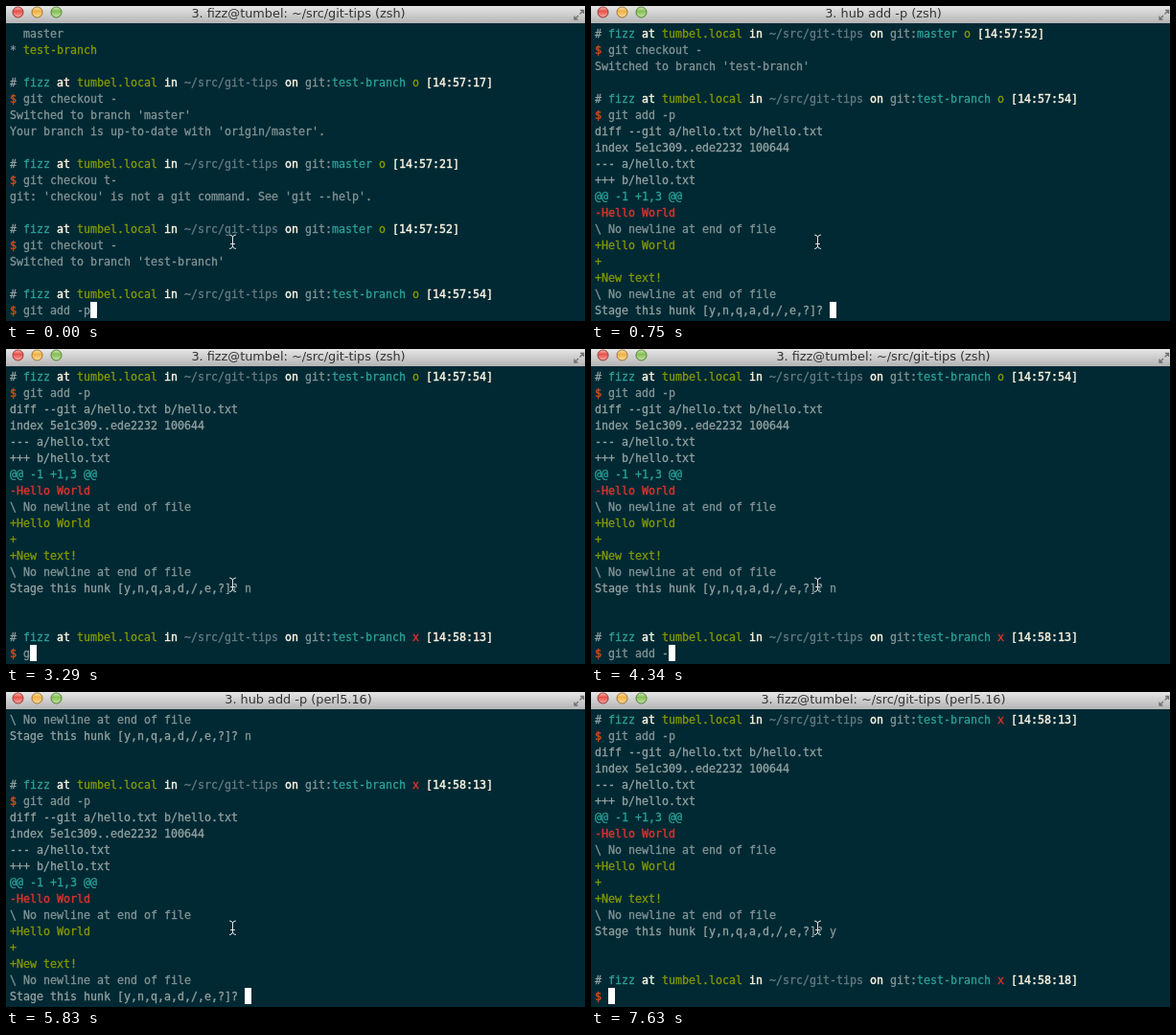
Write an HTML page that moves like this. It is 604 px wide and 329 px high and loops after 8 s.

```html
<!DOCTYPE html>
<html lang="en">
<head>
<meta charset="utf-8">
<title>git add -p</title>
<style>
  html, body { margin: 0; width: 100%; height: 100%; overflow: hidden; background: #002933; }
  #stage { position: relative; width: 604px; height: 329px; overflow: hidden; }

  #bar {
    position: absolute; left: 0; top: 0; width: 604px; height: 18px;
    background: linear-gradient(#e6e6e6, #b4b4b4);
  }
  #titles { position: absolute; left: 3px; top: -1px; width: 604px; height: 17px; overflow: hidden; }
  #titles div {
    font: 12.85px/17px "DejaVu Sans", sans-serif; color: #333;
    text-align: center; white-space: pre; animation: title 8s step-end infinite;
  }
  svg { position: absolute; left: 0; top: 0; }

  #screen { position: absolute; left: 0; top: 20px; width: 604px; height: 306px; overflow: hidden; }
  #log {
    position: relative; top: 1px; margin: 0; padding-left: 4px;
    font: 11.63px/17px "DejaVu Sans Mono", monospace;
    color: #839496; -webkit-text-stroke: .3px;
    animation: scroll 8s step-end infinite;
  }
  /* hides the untyped rest of the bottom row */
  #caret {
    position: absolute; left: 4px; top: 289px; width: 604px; height: 17px;
    background: #002933; border-left: 7px solid #fff;
    animation: caret 8s step-end infinite;
  }
  .white { color: #fdf6e3; -webkit-text-stroke: .4px; }
  .bold { color: #93a1a1; }
  .cyan { color: #2aa198; }
  .green { color: #859900; }
  .red { color: #dc322f; -webkit-text-stroke: .4px; }
  .orange { color: #cb4b16; -webkit-text-stroke: .5px; }
  .dim { color: #657b83; }

  @keyframes title {
    0% { translate: 0 0; }
    9.375% { translate: 0 -17px; }
    16.875% { translate: 0 -34px; }
    35.625% { translate: 0 -51px; }
    41.125% { translate: 0 0; }
    63.625% { translate: 0 -17px; }
    72.875% { translate: 0 -34px; }
    95.375%, 100% { translate: 0 -51px; }
  }
  @keyframes scroll {
    0% { translate: 0 0; }
    7.5% { translate: 0 -17px; }
    9.375% { translate: 0 -204px; }
    33.75% { translate: 0 -272px; }
    63.625% { translate: 0 -289px; }
    65.375% { translate: 0 -476px; }
    93.5%, 100% { translate: 0 -544px; }
  }
  @keyframes caret {
    0% { translate: 84px; }
    7.5% { translate: 0; }
    9.375% { translate: 245px; }
    26.25% { translate: 252px; }
    33.75% { translate: 14px; }
    41.125% { translate: 21px; }
    43% { translate: 35px; }
    44.875% { translate: 42px; }
    46.75% { translate: 49px; }
    48.625% { translate: 56px; }
    50.5% { translate: 70px; }
    54.25% { translate: 77px; }
    56.125% { translate: 84px; }
    63.625% { translate: 0; }
    65.375% { translate: 245px; }
    86% { translate: 252px; }
    93.5%, 100% { translate: 14px; }
  }
</style>
</head>
<body>
<div id="stage">
  <div id="screen">
    <pre id="log"></pre>
    <div id="caret"></div>
  </div>
  <div id="bar"></div>
  <div id="titles">
    <div>3. fizz@tumbel: ~/src/git-tips (zsh)</div>
    <div>3. hub add -p (zsh)</div>
    <div>3. hub add -p (perl5.16)</div>
    <div>3. fizz@tumbel: ~/src/git-tips (perl5.16)</div>
  </div>
  <svg width="604" height="329">
    <defs>
      <linearGradient id="gloss" x2="0" y2="1">
        <stop offset="0" stop-color="#fff" stop-opacity=".55"/>
        <stop offset=".4" stop-color="#fff" stop-opacity=".05"/>
        <stop offset="1" stop-color="#fff" stop-opacity=".5"/>
      </linearGradient>
      <path id="beam" d="M233.500 239q2.500 0 3 2.500q.5-2.500 3-2.500M236.500 241v10M234.500 248.500h4M233.500 253.500q2.500 0 3-2.500q.5 2.500 3 2.500"/>
    </defs>
    <g>
      <circle cx="12.5" cy="6.500" r="5.5" fill="#e8493f" stroke="#8f3a35"/>
      <circle cx="32.5" cy="6.500" r="5.5" fill="#f0ae3a" stroke="#96702d"/>
      <circle cx="52.5" cy="6.500" r="5.5" fill="#7fbd4a" stroke="#4f7a38"/>
    </g>
    <g fill="url(#gloss)">
      <circle cx="12.5" cy="6.500" r="5"/>
      <circle cx="32.5" cy="6.500" r="5"/>
      <circle cx="52.5" cy="6.500" r="5"/>
    </g>
    <path d="M598.500 8.500l4-4M599 4.500h3.500v3.500M597 10l-4 4M593 10.500v3.500h3.500" fill="none" stroke="#707070" stroke-width="1.3"/>
    <g fill="none" stroke-linecap="round">
      <use href="#beam" stroke="#002933" stroke-width="2.2"/>
      <use href="#beam" stroke="#e4e8e8"/>
    </g>
  </svg>
</div>
<script>
  const ink = (color, text) => `<span class="${color}">${text}</span>`;

  const prompt = (branch, clean, time, command) => [
    "",
    [ink("bold", "#"), ink("cyan", "fizz"), ink("white", "at"), ink("green", "tumbel.local"),
     ink("white", "in"), ink("dim", "~/src/git-tips"), ink("white", "on"),
     "git:" + ink("cyan", branch), clean ? ink("green", "o") : ink("red", "x"),
     ink("white", `[${time}]`)].join(" "),
    ink("orange", "$") + " " + command,
  ];

  const noEol = "\\ No newline at end of file";
  const diff = answer => [
    ink("bold", "diff --git a/hello.txt b/hello.txt"),
    ink("bold", "index 5e1c309..ede2232 100644"),
    ink("bold", "--- a/hello.txt"),
    ink("bold", "+++ b/hello.txt"),
    ink("cyan", "@@ -1 +1,3 @@"),
    ink("red", "-Hello World"),
    noEol,
    ink("green", "+Hello World"),
    ink("green", "+"),
    ink("green", "+New text!"),
    noEol,
    ink("bold", "Stage this hunk [y,n,q,a,d,/,e,?]? ") + answer,
    "",
  ];

  document.getElementById("log").innerHTML = [
    "  master",
    "* " + ink("green", "test-branch"),
    ...prompt("test-branch", true, "14:57:17", "git checkout -"),
    "Switched to branch 'master'",
    "Your branch is up-to-date with 'origin/master'.",
    ...prompt("master", true, "14:57:21", "git checkou t-"),
    "git: 'checkou' is not a git command. See 'git --help'.",
    ...prompt("master", true, "14:57:52", "git checkout -"),
    "Switched to branch 'test-branch'",
    ...prompt("test-branch", true, "14:57:54", "git add -p"),
    ...diff("n"),
    ...prompt("test-branch", false, "14:58:13", "git add -p"),
    ...diff("y"),
    ...prompt("test-branch", false, "14:58:18", ""),
  ].join("\n");
</script>
</body>
</html>
```
